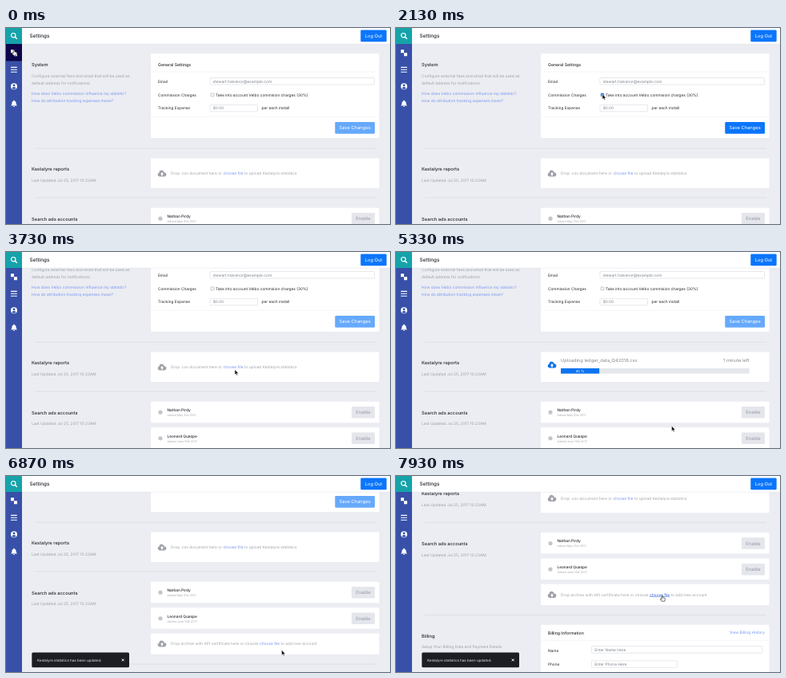
Animation, 480 px wide and 246 px high, one loop 8000 ms. Source, as an HTML page:

```html
<!DOCTYPE html>
<html lang="en">
<head>
<meta charset="utf-8">
<title>Settings</title>
<style>
html, body { margin: 0; width: 100%; height: 100%; overflow: hidden; background: #ecedf2; }
svg { display: block; width: 100vw; height: 100vh; font-family: Inter, "Open Sans", sans-serif; text-rendering: geometricPrecision; }
.link { fill: #7594f0; }
.link.over { fill: #2f63d8; text-decoration: underline; }
</style>
</head>
<body>
<svg id="stage" viewBox="0 0 480 246" preserveAspectRatio="none"></svg>
<script>
const LOOP = 8000, STEP = 200 / 3;
const INK = '#24262d', GREY = '#9a9eaa', HINT = '#7c808a', BLUE = '#0b75fb';
const BOLD = 'font-weight="500"';

// y is the middle of the capitals
const text = (x, y, s, size = 4.85, fill = INK, extra = '') =>
  `<text x="${x}" y="${y + size * 0.36}" font-size="${size}" fill="${fill}" ${extra}>${s}</text>`;
const rect = (x, y, w, h, fill, extra = '') =>
  `<rect x="${x}" y="${y}" width="${w}" height="${h}" fill="${fill}" ${extra}/>`;
const heading = (y, s) => text(32, y, s, 5.75, INK, BOLD);
const note = (y, s) => text(32, y, s, 4.85, GREY);
const label = (y, s) => text(190, y, s, 4.75);
const title = (y, s) => text(190, y, s, 5.2, INK, BOLD);
const card = (y, h) => rect(181, y, 285.5, h, '#fff', 'rx="1"');
const field = (x, y, w, hint) =>
  rect(x, y, w, 8.5, '#fff', 'rx=".8" stroke="#d5d8df" stroke-width=".6"') +
  text(x + 3.7, y + 4.3, hint, 4.85, HINT);
const rule = (x1, x2, y, color) =>
  `<path d="M${x1} ${y}H${x2}" stroke="${color}" stroke-width=".6"/>`;
const divider = y => rule(36, 463, y, '#cfd3de');
const cardRule = y => rule(181, 466.5, y, '#eef0f3');
const link = (x, y, s, extra) => text(x, y, s, 4.85, '#7594f0', extra);
const button = (x, y, w, h, s, fill, color, extra = '') =>
  rect(x, y, w, h, fill, `rx="1.2" ${extra}`) +
  text(x + w / 2, y + h / 2, s, 5.75, color, 'text-anchor="middle"');
const cloud = (y, fill) =>
  `<g transform="translate(195 ${y})"><path d="M-3-3.3Q-1.6-5 .5-4.3Q2.4-3.7 2.7-1.8Q5.4-1.6 5.4 .9Q5.2 3.4 2.7 3.6H-2.8Q-5.3 3.3-5.4 .9Q-5.2-1.1-3.4-1.5Q-3.6-2.6-3-3.3Z" fill="${fill}"/>
  <path d="M0-1.9L2.1.4H.8V2.4H-.8V.4H-2.1Z" fill="#fff"/></g>`;
const dropZone = (y, before, id, after) => cloud(y, '#a0a2a9') +
  text(206, y - 0.5, `${before} <tspan class="link" id="${id}">choose file</tspan> ${after}`, 4.85, '#a0a3ac');
const account = (y, name, date) => card(y, 26.5) +
  `<circle cx="193" cy="${y + 13.5}" r="2.6" fill="#c3c6cc"/>` +
  text(201.5, y + 10.7, name, 4.75, INK, BOLD) +
  text(201.5, y + 17, date, 3.6, '#a3a6ae') +
  button(432, y + 6.3, 29, 14.5, 'Enable', '#e4e6ec', '#9599a5');

const system = heading(46.3, 'System') +
  note(60, 'Configure external fees and email that will be used as') +
  note(69, 'default address for notifications') +
  link(32, 82.3, 'How does Velbo commission influence my statistic?') +
  link(32, 91.3, 'How do attribution tracking expenses mean?') +
  card(32, 106) + title(45.9, 'General Settings') + cardRule(55) +
  label(67.5, 'Email') + field(255, 62.5, 205.5, 'stewart.halvenor@example.com') +
  label(84, 'Commission Charges') +
  rect(256.1, 82, 3.8, 3.8, '#fff', 'id="box" rx=".7" stroke="#8b8e96" stroke-width=".5"') +
  '<path id="tick" d="M256.9 84L257.7 84.9L259.2 82.9" fill="none" stroke="#fff" stroke-width=".6"/>' +
  text(262, 84, 'Take into account Velbo commision charges (30%)', 4.8) +
  label(100.3, 'Tracking Expense') + field(255, 96.4, 59.5, '$0.00') +
  text(319.5, 100.7, 'per each install') + cardRule(111.3) +
  button(411.3, 118, 49.7, 14.8, 'Save Changes', '#66a9fb', '#fff', 'id="save"') +
  divider(151.2);

const reports = heading(177, 'Kestalyre reports') +
  note(191, 'Last Updated Jul 25, 2017 10:23AM') + card(163.5, 37.5) +
  `<g id="drop">${dropZone(183, 'Drop .csv document here or', 'linkA', 'to upload Kestalyre statistics')}</g>
  <g id="upload">${cloud(180, '#0b70ec')}
  ${text(206, 174, 'Uploading ledger_data_Q42018.csv', 5.75, '#85888f')}
  ${text(441.5, 174, '1 minute left', 5.75, '#85888f', 'text-anchor="end"')}
  ${rect(206, 184, 235.5, 6.6, '#e4e7eb')}${rect(206, 184, 0, 6.6, '#0d73ee', 'id="fill"')}
  ${text(206, 187.4, '', 4.3, '#fff', 'id="percent" text-anchor="middle"')}</g>` +
  divider(213);

const accounts = heading(239.6, 'Search ads accounts') +
  note(253.6, 'Last Updated Jul 25, 2017 10:23AM') +
  account(225.7, 'Nathan Pirdy', 'Added May 21st 2017') +
  account(258.3, 'Leonard Quaspe', 'Added June 15th 2017') +
  card(290.5, 26.2) +
  dropZone(304, 'Drop archive with API certificate here or choose', 'linkB', 'to add new account') +
  divider(329.2);

const billing = heading(355.5, 'Billing') +
  note(369.3, 'Setup Your Billing Data and Payment Details') +
  card(341.5, 120) + title(351.8, 'Billing Information') +
  link(461, 351.3, 'View Billing History', 'text-anchor="end"') + cardRule(361.3) +
  label(374, 'Name') + field(244.5, 368.4, 213.5, 'Enter Name Here') +
  label(391, 'Phone') + field(244.5, 386.5, 107, 'Enter Phone Here');

const sidebar = rect(0, 0, 20, 246, '#3850a8') + rect(0, 0, 20, 20, '#15a3aa') +
  rect(0, 20, 20, 21.5, '#0d064a', 'id="hover"') +
  `<g fill="none" stroke="#fff"><circle cx="9.2" cy="9.2" r="2.7" stroke-width="1.2"/>
  <path d="M11.3 11.3L13.8 13.8" stroke-width="1.5"/>
  <path d="M6 49.4H13.8M6 52.3H13.8M6 55.2H13.8" stroke-width="1.1"/></g>
  <g fill="#fff"><path d="M6 27.2H10V31.2H6ZM10 31.2H14V35.2H10Z"/>
  <circle cx="10" cy="73.3" r="4"/>
  <path d="M6.3 97Q7.5 96 7.5 93.6Q7.7 91.7 9.4 91.4V90.7H10.6V91.4Q12.3 91.7 12.5 93.6Q12.5 96 13.7 97V97.5H6.3ZM9 98H11Q10.8 99 10 99Q9.2 99 9 98Z"/></g>
  <g fill="#3850a8"><circle cx="10" cy="72" r="1.4"/><path d="M7.4 75.7Q8.2 74.1 10 74.1Q11.8 74.1 12.6 75.7Q10 77.8 7.4 75.7Z"/></g>`;

const toast = `<g id="toast">${rect(32.3, 221.5, 121.7, 18.7, '#1c1e23', 'rx="1.5"')}
  ${text(39, 230.9, 'Kestalyre statistics has been updated.', 4.5, '#e8e9ec')}
  <path d="M144.8 229.5L147.6 232.3M147.6 229.5L144.8 232.3" stroke="#fff" stroke-width="1"/></g>`;

const cursor = `<g id="cursor" stroke-linejoin="round">
  <path id="arrow" d="M0 0V6.6L1.5 5.3L2.5 7.6L3.6 7.1L2.6 4.9H4.7Z" fill="#111" stroke="#fff" stroke-width=".5"/>
  <path id="hand" d="M-.7.6Q0-.5.7.6V2.7L3 3.3Q3.6 3.7 3.4 4.8L2.8 7.2H-.9L-2.6 4.6Q-2.6 3.6-1.7 4L-.7 4.7Z" fill="#fff" stroke="#111" stroke-width=".6"/></g>`;

document.getElementById('stage').innerHTML =
  rect(0, 0, 480, 246, '#ecedf2') +
  `<g id="page">${system}${reports}${accounts}${billing}</g>` + toast +
  rect(20, 0, 460, 20, '#fff') + rule(20, 480, 20.2, '#e2e4ea') +
  text(29.5, 10.2, 'Settings', 6.35, INK, BOLD) +
  button(443.3, 2.5, 32.4, 14.8, 'Log Out', BLUE, '#fff') + sidebar + cursor;

const el = {};
for (const node of document.querySelectorAll('[id]')) el[node.id] = node;

const ramp = (t, a, b) => Math.min(1, Math.max(0, (t - a) / (b - a)));
const smooth = k => k * k * (3 - 2 * k);
const within = (t, a, b) => t >= a && t < b;
const show = (node, on) => node.setAttribute('visibility', on ? 'visible' : 'hidden');

const legs = [
  { from: 0, to: 867, x: 157, y: 90.5, bend: 32 },
  { from: 1000, to: 1867, x: 258, y: 83 },
  { from: 2733, to: 2933, x: 295, y: 155.5 },
  { from: 3533, to: 3733, x: 286, y: 147.5 },
  { from: 3800, to: 3933, x: 284.5, y: 144 },
  { from: 4400, to: 5267, x: 344.5, y: 218.3 },
  { from: 6933, to: 7733, x: 333, y: 150 },
];

function pointer(t) {
  let x = 10, y = 27;
  for (const leg of legs) {
    const k = smooth(ramp(t, leg.from, leg.to));
    x += (leg.x - x) * k;
    y += (leg.y - y) * k + (leg.bend || 0) * Math.sin(Math.PI * k);
  }
  return [x, y];
}

// A slow start for the first scroll, a fading fling for the second
const scrollAt = t => 38 * ramp(t, 3133, 3400) ** 1.6 +
  116.7 * (1 - (1 - ramp(t, 6733, 7433)) ** 3);

const percentAt = t => 20.4 * smooth(ramp(t, 4533, 5267)) +
  36 * ramp(t, 5333, 6133) + 43.6 * ramp(t, 6133, 6333);

function draw(time) {
  const t = Math.floor((time % LOOP + 5) / STEP) * STEP + 0.5;
  el.page.setAttribute('transform', `translate(0 ${-scrollAt(t)})`);

  const onIcon = t < 60, onA = within(t, 3866, 4466), onB = t > 7666;
  const hand = onIcon || onA || onB;
  el.cursor.setAttribute('transform', `translate(${pointer(t)})`);
  show(el.arrow, !hand);
  show(el.hand, hand);
  show(el.hover, onIcon);
  el.linkA.classList.toggle('over', onA);
  el.linkB.classList.toggle('over', onB);

  const checked = within(t, 1933, 2466);
  el.box.setAttribute('fill', checked ? '#1c73ee' : '#fff');
  el.box.setAttribute('stroke', checked ? '#1c73ee' : '#8b8e96');
  show(el.tick, checked);
  const lit = ramp(t, 1867, 2133) - ramp(t, 2400, 2600);
  el.save.setAttribute('fill', `rgb(${102 - 91 * lit},${169 - 52 * lit},251)`);

  const busy = within(t, 4466, 6400);
  show(el.upload, busy);
  show(el.drop, !busy);
  const percent = percentAt(t), w = percent * 2.355;
  el.fill.setAttribute('width', w);
  el.percent.setAttribute('x', 206 + w / 2);
  el.percent.textContent = w < 12 ? '' : Math.ceil(percent / 20) * 20 + ' %';

  el.toast.setAttribute('opacity', ramp(t, 6267, 6467));
}

const start = performance.now();
function tick() {
  draw(performance.now() - start);
  requestAnimationFrame(tick);
}
tick();
</script>
</body>
</html>
```
